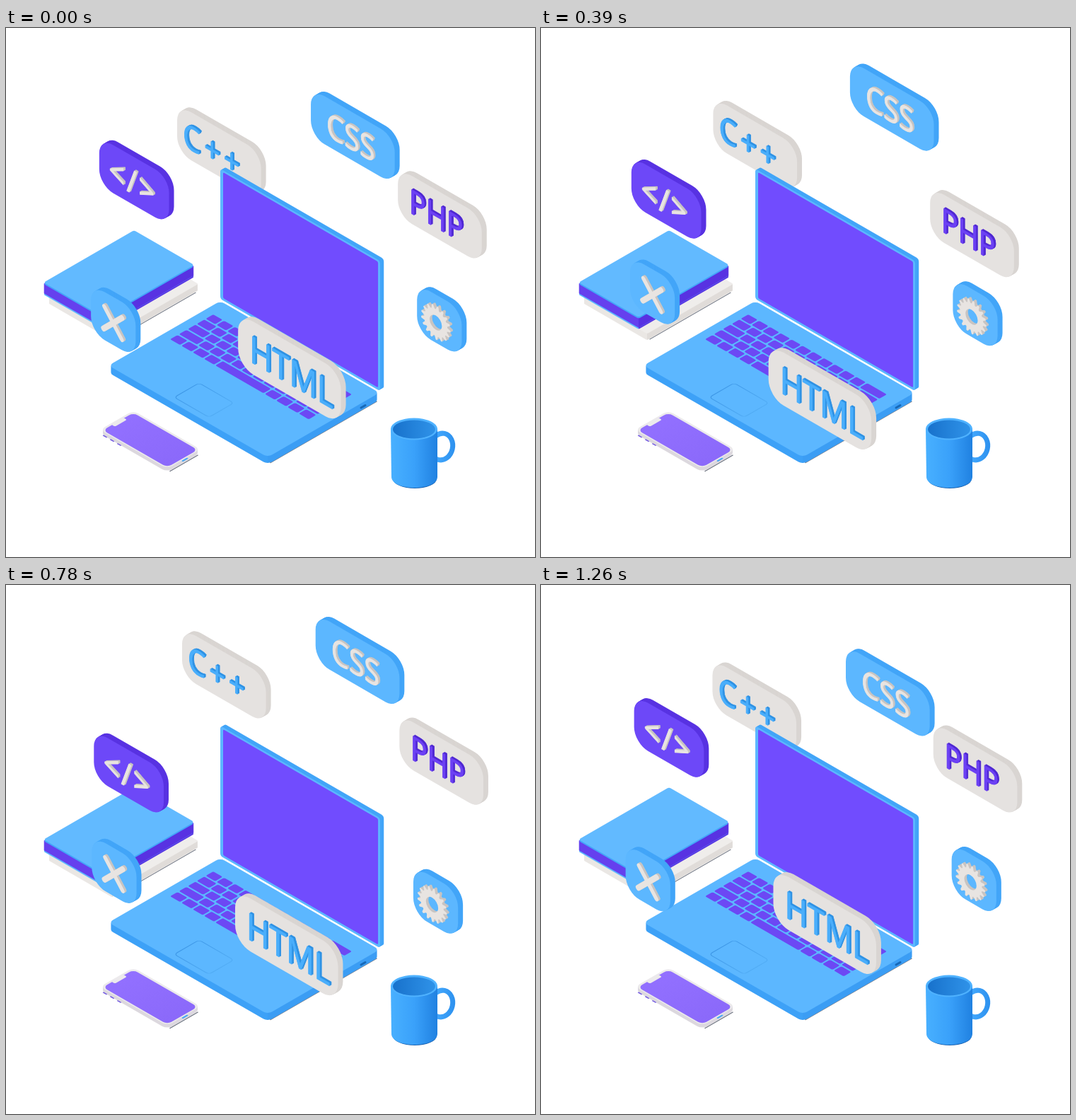
An HTML page with a canvas for the animation above (1.29 s loop, 748 by 748 pixels).

```html
<!DOCTYPE html>
<html lang="en">
<head>
<meta charset="utf-8">
<title>Isometric coding desk</title>
<style>
  html, body { margin: 0; width: 100%; height: 100%; overflow: hidden; background: #fff; }
  canvas { display: block; width: 748px; height: 748px; }
</style>
</head>
<body>
<canvas id="stage" width="748" height="748"></canvas>
<script>
const ctx = document.getElementById('stage').getContext('2d');
const LOOP = 1290, STEP = 30, SWING = 27, TAU = Math.PI * 2;
const SLOPE = 0.577;

// Isometric planes: upright facing left, its lettering, and the desk top.
const WALL = [0.866, 0.5, 0, 1];
const LETTERING = [0.83, 0.83 * SLOPE, 0, 1];
const FLOOR = [1, SLOPE, -1, SLOPE];

const SKY = '#5cb7ff', SKY_SIDE = '#42a5f8', VIOLET = '#704cff', VIOLET_SIDE = '#5832e2';
const SKINS = {
  sky: [SKY, SKY_SIDE],
  paper: ['#e5e2e0', '#d9d5d2'],
  violet: ['#6d48f8', VIOLET_SIDE]
};
const INKS = {
  paper: ['#e8e4e1', '#c8c4c2'],
  sky: ['#4aaefb', '#2f92e4'],
  violet: ['#6c41f4', '#5029d2']
};

function inPlane(plane, x, y, draw) {
  ctx.save();
  ctx.translate(x, y);
  ctx.transform(...plane, 0, 0);
  draw();
  ctx.restore();
}

function panel(fill, x, y, w, h, radius) {
  ctx.beginPath();
  ctx.roundRect(x, y, w, h, radius);
  ctx.fillStyle = fill;
  ctx.fill();
}

function line(color, width, ...points) {
  ctx.beginPath();
  points.forEach(p => ctx.lineTo(...p));
  ctx.strokeStyle = color;
  ctx.lineWidth = width;
  ctx.lineJoin = ctx.lineCap = 'round';
  ctx.stroke();
}

function ellipse(fill, x, y, rx, ry) {
  ctx.beginPath();
  ctx.ellipse(x, y, rx, ry, 0, 0, TAU);
  ctx.fillStyle = fill;
  ctx.fill();
}

function gradient(x0, x1, ...colors) {
  const g = ctx.createLinearGradient(x0, 0, x1, 0);
  colors.forEach((c, i) => g.addColorStop(i / (colors.length - 1), c));
  return g;
}

// Thickens an upright drawing: shaded copies behind, the front last.
function extrude(x, y, depth, plane, [front, side], draw) {
  for (let i = depth; i >= 0; i--) {
    inPlane(plane, x + i * 0.87, y - i * 0.5, () => draw(i ? side : front));
  }
}

// Flat block on the desk; (x, y) is the far corner of its top face.
function slab(x, y, a, b, height, radius, top, left, right = left) {
  const span = (a + b) / 2;
  const sides = ctx.createLinearGradient(0, b, span, b - span);
  sides.addColorStop(a / (a + b), left);
  sides.addColorStop(a / (a + b), right);
  for (let z = height; z >= 0; z--) {
    inPlane(FLOOR, x, y + z, () => panel(z ? sides : top, 0, 0, a, b, radius));
  }
}

function shadow(x, y, a, b) {
  inPlane(FLOOR, x, y, () => line('rgba(20,30,50,.6)', 1.2, [a, b - 4], [a, 4]));
}

function label(text, x, ink, spacing = 0) {
  return (px, py, h) => {
    ctx.font = `${h * 0.7}px "Open Sans", sans-serif`;
    ctx.letterSpacing = spacing + 'px';
    ctx.lineJoin = 'round';
    ctx.lineWidth = 1;
    extrude(px + x, py + h * 0.79 + x * SLOPE, 3, LETTERING, INKS[ink], color => {
      ctx.fillStyle = ctx.strokeStyle = color;
      ctx.fillText(text, 0, 0);
      ctx.strokeText(text, 0, 0);
    });
  };
}

function cross(px, py) {
  extrude(px, py, 3, WALL, INKS.paper, color => {
    line(color, 7, [22, 21], [50, 53]);
    line(color, 7, [51, 22], [20, 53]);
  });
}

function gear(px, py) {
  const corners = 17 * 4;
  extrude(px + 26.5, py + 55, 4, WALL, INKS.paper, color => {
    ctx.beginPath();
    for (let i = 0; i < corners; i++) {
      const r = i % 4 < 2 ? 24 : 19, a = i / corners * TAU;
      ctx.lineTo(r * Math.cos(a), r * Math.sin(a));
    }
    ctx.closePath();
    ctx.moveTo(10, 0);
    ctx.arc(0, 0, 10, 0, TAU, true);
    ctx.fillStyle = color;
    ctx.fill();
  });
}

// Peak is the loop angle in degrees at which a tile hangs lowest.
const tile = (x, y, w, skin, peak, mark, h = 68) => ({ x, y, w, h, skin, peak, mark });
const cpp = tile(245, 87.6, 137, 'paper', 42, label('C++', 8, 'sky', 6));
const tiles = [
  tile(435, 58.6, 137, 'sky', -9.5, label('CSS', 22, 'paper')),
  tile(554, 198.6, 137, 'paper', 92, label('PHP', 15.5, 'violet')),
  tile(128, 180, 114, 'violet', 196, label('</>', 13.5, 'paper', 3)),
  tile(122, 349.5, 73, 'sky', 298, cross),
  tile(579.5, 373, 73, 'sky', 245, gear),
  tile(325, 424, 168, 'paper', 142, label('HTML', 16, 'sky'), 75)
];

function drawTile({ x, y, w, h, skin, peak, mark }, time) {
  const dy = SWING * Math.cos(time / LOOP * TAU - peak / 360 * TAU);
  const px = x - dy * 0.148, py = y + dy;
  extrude(px, py, 8, WALL, SKINS[skin], color => panel(color, 0, 0, w, h, h / 3));
  mark(px, py, h);
}

function drawBooks() {
  shadow(182, 320, 90, 122);
  slab(182, 310, 90, 122, 9, 2, '#efedeb', '#eae7e4', '#e0dcd9');
  slab(181, 301, 85, 128, 2, 2, SKY, SKY, VIOLET_SIDE);
  slab(181, 288, 85, 128, 13, 1, VIOLET, '#6540ee', VIOLET_SIDE);
  slab(181, 286, 85, 128, 2, 3, '#62baff', SKY_SIDE);
}

function drawKeys() {
  const width = 198, row = 12.6, pitch = 15.3, gap = 2;
  const key = (x, r, w) => panel('#6c48f4', x, r * row, w - gap, row - gap, 2);
  inPlane(FLOOR, 293, 405, () => {
    for (let r = 0; r < 4; r++) {
      let x = pitch + r * 4;
      key(0, r, x);
      for (; x + 2 * pitch < width; x += pitch) key(x, r, pitch);
      key(x, r, width - x);
    }
    for (let i = 0; i < 4; i++) {
      key(i * 16, 4, 16);
      key(width - (i + 1) * 16, 4, 16);
    }
    key(64, 4, width - 128);
  });
}

function drawLaptop() {
  shadow(303, 396, 225, 158);
  slab(303, 386, 225, 158, 10, 6, SKY, '#3da1f7', '#3b9df4');
  line('#1769b8', 3, [502, 537], [508, 533.5]);
  drawKeys();
  inPlane(FLOOR, 273, 502, () => {
    ctx.beginPath();
    ctx.roundRect(0, 0, 49, 35, 4);
    ctx.lineWidth = 1;
    ctx.strokeStyle = gradient(0, 49, '#3c96e6', '#50abf4');
    ctx.stroke();
  });

  extrude(303, 199, 6, WALL, [SKY, SKY_SIDE], color => panel(color, 0, 0, 261, 184, 4));
  inPlane(WALL, 307, 201, () => panel('#714cfe', 0, 3, 253, 178, 2));
}

function drawPhone() {
  shadow(180, 547, 95, 47);
  slab(180, 541, 95, 47, 5, 7, '#eceaec', '#dcd8de');
  inPlane(FLOOR, 180, 544, () => {
    panel(gradient(0, 90, '#9270ff', '#8b69fa'), 0, 0, 91, 43, 6);
    panel('#eceaec', -1, 13, 5, 17, 2);
    for (let i = 0; i < 3; i++) line('#745be0', 1.6, [7 + i * 10, 49], [11 + i * 10, 49]);
    line('#4aa9f5', 2, [94, 24], [94, 18]);
  });
}

function drawMug() {
  ctx.lineWidth = 7;
  ctx.strokeStyle = gradient(608, 636, '#43a8fd', '#2c90ee');
  ctx.beginPath();
  ctx.ellipse(616, 592, 15.5, 19, 0.22, 0, TAU);
  ctx.stroke();

  ellipse('#175fae', 578, 637.5, 31, 13.5);
  ctx.beginPath();
  ctx.moveTo(544, 566);
  ctx.lineTo(545, 635);
  ctx.bezierCurveTo(546, 655, 609, 655, 610, 635);
  ctx.lineTo(610, 566);
  ctx.fillStyle = gradient(544, 611, '#48b0ff', '#3aa1fa', '#1f80e0');
  ctx.fill();
  ellipse('#4fb2ff', 577, 567, 33, 15.5);
  ellipse(gradient(548, 606, '#1872cc', '#2f92e8'), 577, 567.5, 30, 13);
}

function render(time) {
  ctx.fillStyle = '#fff';
  ctx.fillRect(0, 0, 748, 748);
  drawBooks();
  drawTile(cpp, time);
  drawLaptop();
  drawPhone();
  drawMug();
  tiles.forEach(t => drawTile(t, time));
}

const start = performance.now();
function tick() {
  const elapsed = (performance.now() - start) % LOOP;
  render(Math.floor(elapsed / STEP) * STEP);
  requestAnimationFrame(tick);
}
tick();
</script>
</body>
</html>
```
